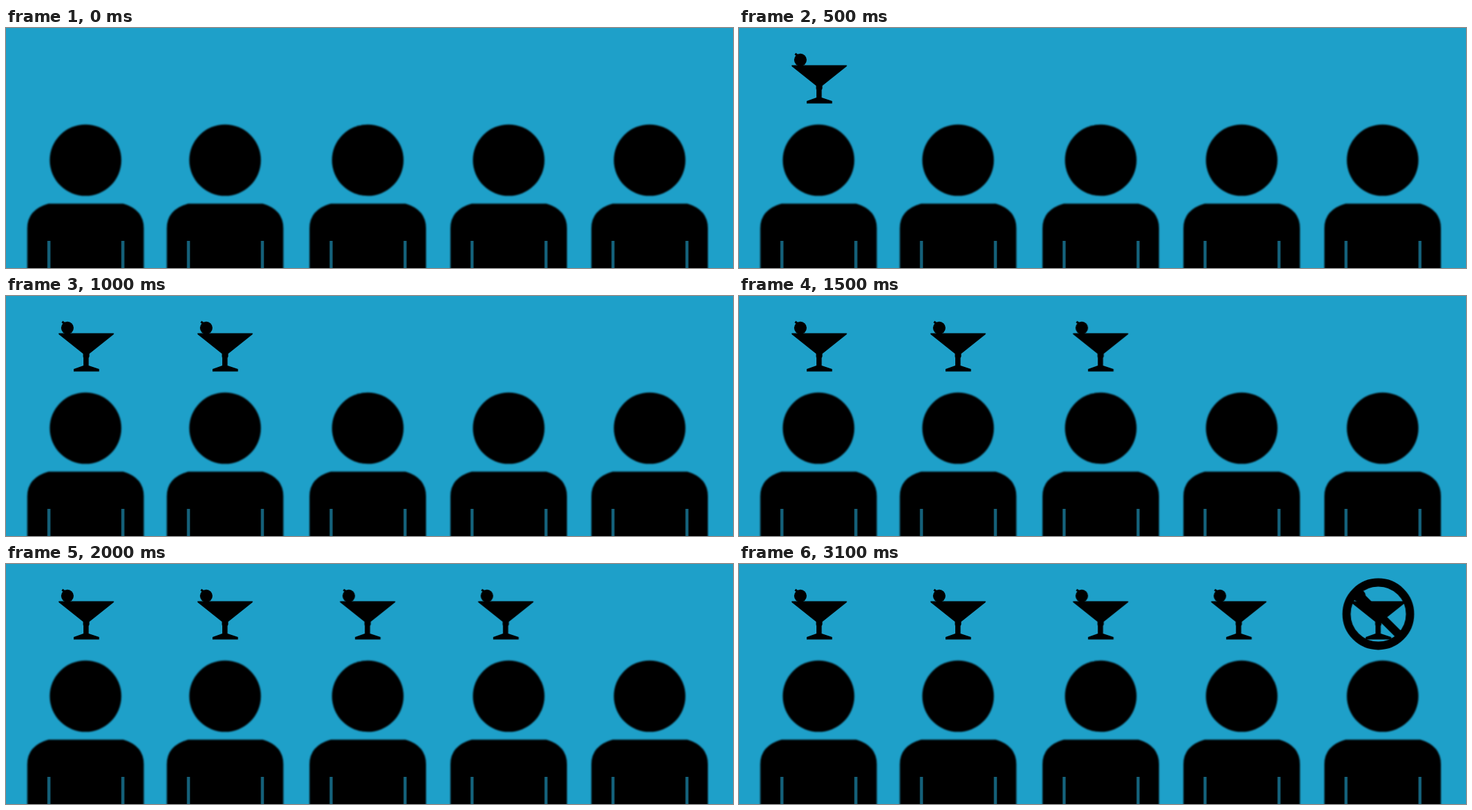
An HTML page that plays this animation: 1042 px wide and 345 px high, repeating every 3500 ms.

```html
<!DOCTYPE html>
<html lang="en">
<head>
<meta charset="utf-8">
<title>Four drinks, five people</title>
<style>
  html, body { margin: 0; width: 100%; height: 100%; overflow: hidden; background: #1ea0c9; }
  svg { display: block; width: 100%; height: 100%; }
  .drink { opacity: 0; }
</style>
</head>
<body>
<svg viewBox="0 0 1042 345">
  <defs>
    <filter id="soft" x="-5%" y="-5%" width="110%" height="110%">
      <feGaussianBlur stdDeviation="1.1"/>
    </filter>
    <!-- Both symbols are centred on x = 0 -->
    <g id="person">
      <g filter="url(#soft)">
        <circle cy="190" r="51.3"/>
        <path d="M-53 252.5H54Q83.5 261 83.5 288V360H-83.5V288Q-83.5 261 -53 252.5Z"/>
      </g>
      <path d="M-52.5 306V345M53.5 306V345" stroke="#14617a" stroke-width="4.4"/>
    </g>
    <g id="glass">
      <path d="M-39.5 53.5H39.5V55L4.5 83V87L3.5 89V100L18.5 105V108.5H-18V105L-4 100V89L-4.5 87V83L-39.5 55Z"/>
      <circle cx="-27" cy="45.8" r="9"/>
      <path d="M-34.5 37L-29 41" stroke="#000" stroke-width="3"/>
    </g>
  </defs>
  <g id="people"></g>
  <g id="drinks"></g>
</svg>
<script>
const LOOP = 3500;
const people = [114, 314, 518.5, 720.5, 922.5];
const drinks = [
  { x: 115, at: 500 },
  { x: 314, at: 1000 },
  { x: 518.3, at: 1500 },
  { x: 716.3, at: 2000 },
  { x: 916.3, at: 2500, banned: true }
];

function add(parent, tag, attrs) {
  const el = document.createElementNS("http://www.w3.org/2000/svg", tag);
  for (const key in attrs) el.setAttribute(key, attrs[key]);
  return parent.appendChild(el);
}

const crowd = document.getElementById("people");
for (const x of people) add(crowd, "use", { href: "#person", x });

const row = document.getElementById("drinks");
for (const { x, at, banned } of drinks) {
  const drink = add(row, "g", { class: "drink", transform: `translate(${x} 0)` });
  add(drink, "use", { href: "#glass" });
  if (banned) {
    const ink = { fill: "none", stroke: "#000", "stroke-width": 11.8 };
    add(drink, "circle", { cy: 72, r: 45.5, ...ink });
    add(drink, "path", { d: "M-31 41L31 103", ...ink });
  }
  drink.animate([
    { opacity: 0, offset: 0, easing: "step-end" },
    { opacity: 1, offset: at / LOOP },
    { opacity: 1, offset: 1 }
  ], { duration: LOOP, iterations: Infinity }).startTime = 0;
}
</script>
</body>
</html>
```
